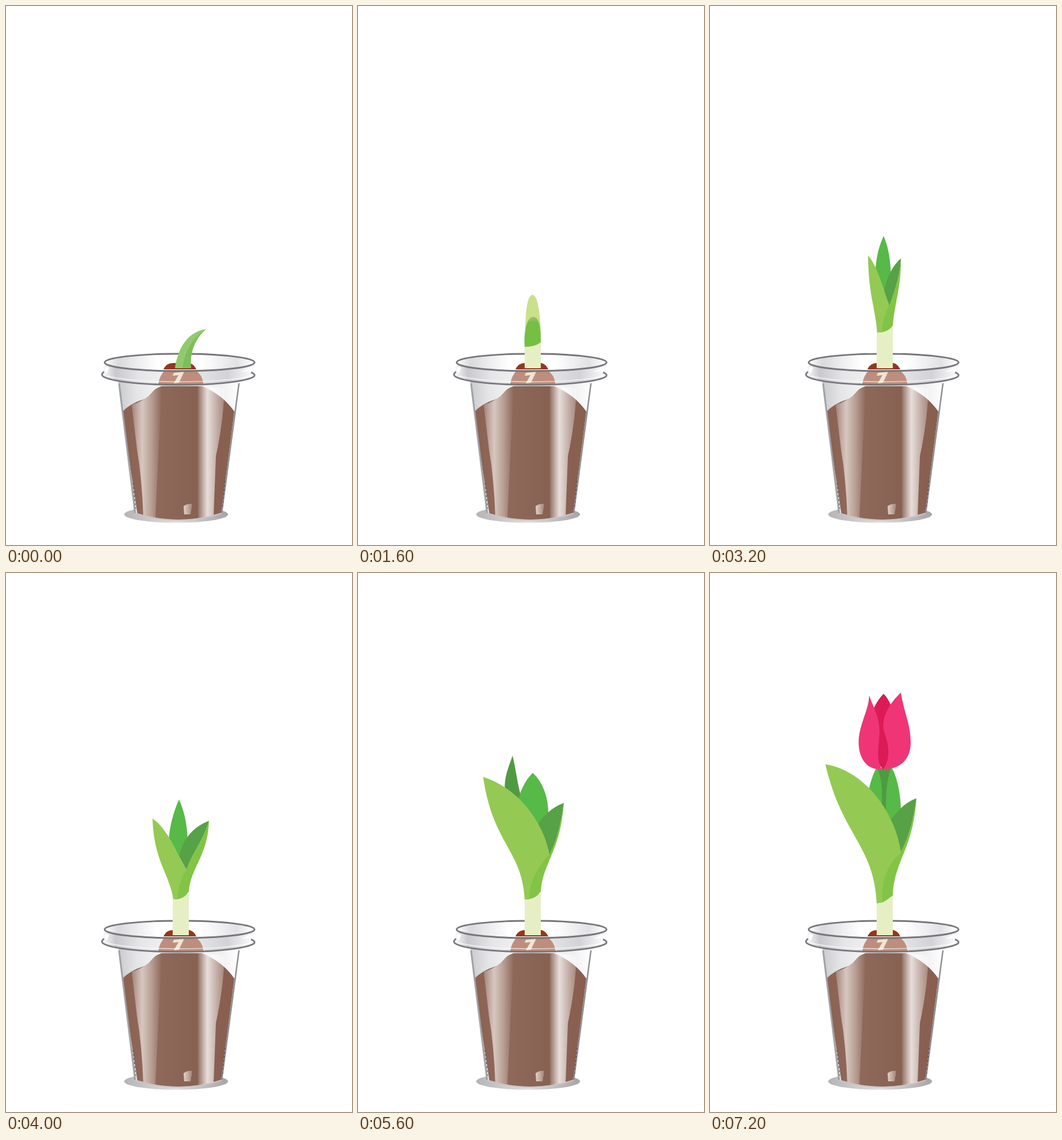
An HTML page that plays this animation: 600x933 px, repeating every 8 s.

```html
<!DOCTYPE html>
<html lang="en">
<head>
<meta charset="utf-8">
<title>Growing tulip</title>
<style>
html, body { margin: 0; height: 100%; overflow: hidden; background: #fff; }
svg { display: block; width: 100vw; height: 100vh; }
</style>
</head>
<body>
<svg viewBox="0 0 600 933">
  <defs>
    <linearGradient id="soil">
      <stop offset="0" stop-color="#8b6051"/>
      <stop offset=".25" stop-color="#906a5b"/>
      <stop offset=".6" stop-color="#876354"/>
      <stop offset="1" stop-color="#8a5e4f"/>
    </linearGradient>
    <linearGradient id="shineLeft">
      <stop offset="0" stop-color="#fff" stop-opacity=".2"/>
      <stop offset=".35" stop-color="#f6f0ec" stop-opacity=".7"/>
      <stop offset="1" stop-color="#fff" stop-opacity="0"/>
    </linearGradient>
    <linearGradient id="shineRight">
      <stop offset="0" stop-color="#fff" stop-opacity=".1"/>
      <stop offset=".35" stop-color="#f8f4f1" stop-opacity=".85"/>
      <stop offset=".55" stop-color="#fff" stop-opacity=".62"/>
      <stop offset="1" stop-color="#fff" stop-opacity=".25"/>
    </linearGradient>
    <linearGradient id="rim">
      <stop offset="0" stop-color="#fff"/>
      <stop offset=".09" stop-color="#dadadd"/>
      <stop offset=".25" stop-color="#f1f1f2"/>
      <stop offset=".35" stop-color="#fff"/>
      <stop offset=".65" stop-color="#fff"/>
      <stop offset=".88" stop-color="#e2e2e5"/>
      <stop offset="1" stop-color="#fff"/>
    </linearGradient>
    <linearGradient id="band">
      <stop offset="0" stop-color="#fff"/>
      <stop offset=".09" stop-color="#c9c9cc"/>
      <stop offset=".25" stop-color="#e6e6e8"/>
      <stop offset=".4" stop-color="#efeff0"/>
      <stop offset=".65" stop-color="#e2e2e4"/>
      <stop offset=".82" stop-color="#d3d3d6"/>
      <stop offset="1" stop-color="#fff"/>
    </linearGradient>
    <linearGradient id="glass">
      <stop offset="0" stop-color="#c9cace"/>
      <stop offset=".14" stop-color="#e4e4e6"/>
      <stop offset=".4" stop-color="#f8f8f8"/>
      <stop offset=".85" stop-color="#f0f0f1"/>
      <stop offset="1" stop-color="#fff"/>
    </linearGradient>
    <linearGradient id="shadow">
      <stop offset="0" stop-color="#b5b5b5"/>
      <stop offset=".5" stop-color="#dedede"/>
      <stop offset="1" stop-color="#a5a5a5"/>
    </linearGradient>
    <linearGradient id="glint">
      <stop offset="0" stop-color="#f0e7dc" stop-opacity=".85"/>
      <stop offset="1" stop-color="#f0e7dc" stop-opacity=".25"/>
    </linearGradient>
    <linearGradient id="patch" x2="0" y2="1">
      <stop offset="0" stop-color="#a4bd73"/>
      <stop offset=".2" stop-color="#74c043"/>
    </linearGradient>
  </defs>

  <!-- cup, soil and bulb -->
  <ellipse cx="295" cy="880" rx="90" ry="14.5" fill="url(#shadow)"/>
  <path d="M195 650 L224 878 Q300 902 374 878 L405 650Z" fill="url(#glass)"/>
  <path d="M201 703 Q215 688 238 681 C252 675 252 664 270 658 H340 Q376 673 396 702 L373 878 Q300 900 228 880Z" fill="url(#soil)"/>
  <path d="M218 690 Q240 684 250 670 L270 658 L259 886 L238 882 Q236 820 227 766Z" fill="url(#shineLeft)"/>
  <path d="M333 657 L379 662 Q377 720 364 779 L360 882 L333 887Z" fill="url(#shineRight)"/>
  <path d="M309 880 L308 866 Q314 861 323 862 L320 880Z" fill="url(#glint)"/>
  <path d="M196 653 L224 878" stroke="#a0a1a7" stroke-width="3"/>
  <path d="M404 653 L374 878" stroke="#8b8c92" stroke-width="2.4"/>
  <path d="M220 826 L225 870 M380 822 L375 870" fill="none" stroke="#444" stroke-dasharray="3 4"/>
  <path d="M224 878 Q300 902 374 878" fill="none" stroke="#c9c6c6" stroke-width="2"/>

  <ellipse cx="301" cy="617" rx="130" ry="15" fill="url(#rim)"/>
  <path d="M171 617 A130 15 0 0 0 431 617 L432 640 Q400 656 300 656 T166 638Z" fill="url(#band)"/>
  <path d="M172 625 l7 1 -3 8 -4 2Z M428 624 l-20 9 18 -1Z" fill="#fff"/>
  <path d="M264 655 Q266 640 276 630 H328 Q342 640 342 655Z" fill="#bd8e7c"/>
  <path d="M291 635 L309 633 L300 652 L291 653 L299 639 L289 640Z" fill="#f0e4d3"/>
  <path d="M273 629 Q278 618 289 618 H318 Q326 620 330 629Z" fill="#94371f"/>
  <path d="M171 617 A130 15 0 0 1 431 617" fill="none" stroke="#77767c" stroke-width="2.8"/>

  <g id="plant"></g>

  <!-- front of the rim -->
  <g fill="none" stroke="#77767c">
    <path d="M171 617 A130 15 0 0 0 431 617" stroke-width="3"/>
    <path d="M170 633 Q162 639 172 643 C210 660 390 660 427 643 Q436 639 425 634" stroke-width="2.8"/>
    <path d="M176 640 C220 654 380 654 424 640" stroke="#fff" stroke-width="1.5" opacity=".7"/>
  </g>
</svg>
<script>
const STEP = 800;
const color = {
  stem: "#e6efc4", tip: "#cbe08a", light: "#94c954", fold: "#81c446",
  mid: "#57b947", dark: "#57a146", back: "#4f9a43", pink: "#ef3575", red: "#dc1a55"
};
const shape = (d, fill) => `<path d="${d}" fill="${color[fill] || fill}"/>`;
const stem = shape("M289 627 V556 H317 V627Z", "stem");

// Closed shoot: tip height, top of the green patch, its left and right lower ends
const shoot = (top, patch, left, right) =>
  shape(`M289 627 V${left - 15} H317 V627Z`, "stem") +
  shape(`M290 ${left} C289 ${top + 40} 292 ${top} 302.5 ${top} S317 ${top + 40} 317 ${right} Q306 ${left} 290 ${left}Z`, "tip") +
  shape(`M289 ${left} C287 ${patch + 25} 293 ${patch} 304 ${patch} S317 ${patch + 22} 317 ${right} Q307 ${left} 289 ${left}Z`, "url(#patch)");

const sprout =
  shape("M293 627 C298 594 313 565 347 559 C324 580 319 603 321 627Z", "#90ca6d") +
  shape("M347 559 C324 580 319 603 321 627 H306 C311 600 318 580 347 559Z", "#7fbd5c");

const narrowLeaves = stem +
  shape("M301 398 C311 420 314 450 314 478 L302 502 L287 470 C286 445 291 420 301 398Z", "mid") +
  shape("M331 437 C316 450 303 475 302 500 L311 520 C321 490 330 467 331 437Z", "dark") +
  shape("M331 437 C330 467 321 490 311 518 Q294 530 292 565 Q309 565 317 553 C319 520 332 485 331 437Z", "fold") +
  shape("M274 432 C291 450 302 495 311 518 Q298 542 298 565 H290 C286 520 275 500 274 432Z", "light");

const openLeaves = stem +
  shape("M300 392 C312 418 315 445 315 470 L301 494 L282 463 C284 437 290 415 300 392Z", "mid") +
  shape("M352 429 C324 439 303 465 301 492 L313 514 C323 484 344 460 352 429Z", "dark") +
  shape("M352 429 C344 460 323 484 313 513 Q294 530 292 565 Q309 565 317 551 C320 510 350 490 352 429Z", "fold") +
  shape("M254 425 C282 444 297 488 313 513 C302 530 298 548 298 565 L290 564 C283 520 257 500 254 425Z", "light");

const wideLeaves = stem +
  shape("M303 355 C319 370 328 395 330 420 L310 450 L277 412 C282 385 290 370 303 355Z", "mid") +
  shape("M355 407 C335 412 319 426 308 444 L332 494 C346 465 351 440 355 407Z", "dark") +
  shape("M355 407 C351 440 346 465 332 493 Q296 520 292 565 Q308 565 318 551 C322 505 351 485 355 407Z", "fold") +
  shape("M234 376 C288 400 323 448 332 493 C308 520 297 543 297 565 H290 C284 485 240 485 234 376Z", "light");

const frontLeaves = (leftEnd, rightEnd) =>
  shape("M358 390 C338 397 322 414 311 432 L331 484 C346 455 353 425 358 390Z", "dark") +
  shape(`M358 390 C353 425 346 455 331 482 Q296 515 292 ${leftEnd - 1} L300 ${leftEnd - 2} Q310 ${rightEnd + 6} 317 ${rightEnd} C319 498 352 480 358 390Z`, "fold") +
  shape(`M200 331 C269 342 321 415 331 482 C306 508 297 535 299 ${leftEnd - 2} L289 ${leftEnd} C284 470 229 455 200 331Z`, "light");

const budding = stem +
  shape("M268 316 C274 340 276 365 285 395 L255 385 C252 355 260 340 268 316Z", "back") +
  shape("M303 346 C321 362 330 390 330 415 L311 442 L275 405 C280 378 289 360 303 346Z", "mid") +
  shape("M357 398 C337 405 321 420 310 438 L332 490 C346 460 352 433 357 398Z", "dark") +
  shape("M357 398 C352 433 346 460 332 487 Q296 517 292 565 Q309 564 317 551 C320 502 351 483 357 398Z", "fold") +
  shape("M217 353 C278 372 322 432 332 487 C307 514 297 540 297 565 H289 C284 478 234 470 217 353Z", "light");

const bud = stem +
  shape("M267 208 C278 245 269 270 273 300 C277 345 290 365 292 398 L247 356 C240 300 259 262 267 208Z", "back") +
  shape("M320 358 C328 374 330 395 330 412 L311 436 L284 390 V365Z", "mid") +
  shape("M287 370 C298 380 298 395 298 412 L305 422 C305 400 306 385 314 368Z", "back") +
  frontLeaves(564, 551) +
  shape("M303 271 C319 290 327 328 323 352 C319 379 289 380 282 360 C276 335 282 294 303 271Z", "pink") +
  shape("M303 271 C309 296 285 315 282 360 C276 335 282 294 303 271Z", "red");

const bloom = stem +
  shape("M288 338 H316 C327 360 331 390 331 412 L311 436 L274 382 C277 365 282 350 288 338Z", "mid") +
  shape("M290 338 C298 353 299 375 298 410 L305 422 C305 390 305 360 314 338Z", "back") +
  frontLeaves(572, 558) +
  shape("M301 209 Q309 217 314 230 L312 330 L300 340 L288 325 L284 234 Q291 219 301 209Z", "red") +
  shape("M276 212 C284 235 294 248 294 276 C293 300 287 320 298 340 C266 341 256 313 258 286 C261 257 275 238 276 212Z", "pink") +
  shape("M331 207 C336 240 348 262 348 294 C348 323 328 341 301 339 C313 320 311 300 302 275 C295 253 311 225 331 207Z", "pink");

const stages = [
  sprout, shoot(532, 556, 597, 590), shoot(500, 538, 590, 582), shoot(458, 516, 582, 571),
  narrowLeaves, openLeaves, wideLeaves, budding, bud, bloom
];
const plant = document.getElementById("plant");
let shown = -1;

function draw() {
  const stage = Math.floor(performance.now() / STEP) % stages.length;
  if (stage !== shown) plant.innerHTML = stages[shown = stage];
  requestAnimationFrame(draw);
}
draw();
</script>
</body>
</html>
```
